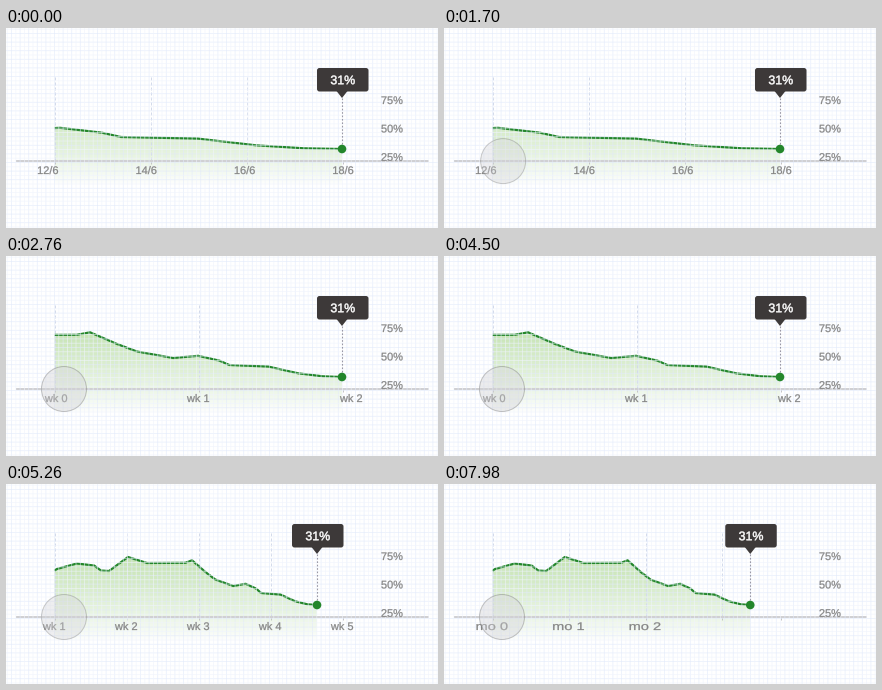
A matplotlib script for the animation above (8000 ms loop, 432x200 px).

```python
import numpy as np
import matplotlib.pyplot as plt
from matplotlib.animation import FuncAnimation
from matplotlib.collections import LineCollection
from matplotlib.colors import to_rgb
from matplotlib.patches import Circle, FancyBboxPatch, PathPatch, Polygon
from matplotlib.textpath import TextPath
from matplotlib.transforms import Affine2D

W, H, DPI = 432, 200, 100
STEP, LOOP = 20, 8000
PX = 72 / DPI
LEFT, RIGHT, AXIS_Y, TOP_Y, FADE_Y = 48.5, 336, 132.5, 70, 158
GREEN, DARK, GREY = "#23862b", "#3d3939", "#858585"

# Key points: distance back from the newest reading, height on the stage
BACK, LEVEL = np.array([
    (0, 121), (38, 120.3), (86, 117.3), (144, 110.6), (221, 109),
    (240, 104.7), (282, 99.8), (331, 102), (402, 95.5), (441, 88),
    (494, 76.3), (520, 78.8), (672, 79), (747, 73), (822, 87), (854, 86.5),
    (881, 81.5), (949, 79.5), (1028, 85), (1090, 97)]).T


def lerp(a, b, k):
    return a + (b - a) * k


def ease(p, power=3):
    p = min(max(p, 0), 1)
    if p < .5:
        return (2 * p) ** power / 2
    return 1 - (2 - 2 * p) ** power / 2


fig = plt.figure(figsize=(W / DPI, H / DPI), dpi=DPI, facecolor="white")
ax = fig.add_axes([0, 0, 1, 1])
ax.axis("off")


def glyphs(text, size, color, weight=.25, z=4):
    path = TextPath((0, 0), text, size=size,
                    prop={"family": "Liberation Sans"})
    box = path.get_extents()
    path = path.transformed(Affine2D().translate(-(box.x0 + box.x1) / 2, 0))
    return ax.add_patch(PathPatch(path, fc=color, ec=color, lw=weight * PX,
                                  zorder=z))


def place(patch, x, y, width=1, base=None):
    move = Affine2D().scale(width, -1).translate(x, y)
    patch.set_transform(move + (base or ax.transData))


def rule(xs, ys, color, width, **kw):
    return ax.plot(xs, ys, color=color, lw=width * PX,
                   solid_capstyle="butt", **kw)[0]


class Label:
    """Axis text whose place, opacity and width follow the zoom."""

    def __init__(self, text, x0, x1=None, fade=(1, 1), width=(1, 1)):
        self.patch = glyphs(text, 11, GREY)
        self.x = x0, x0 if x1 is None else x1
        self.fade, self.width = fade, width

    def draw(self, k):
        place(self.patch, lerp(*self.x, k), 146, lerp(*self.width, k))
        self.patch.set_alpha(lerp(*self.fade, k))


class Stage:
    """A zoom: curve scale, newest x and tick gap at its end."""

    def __init__(self, start, span, scale, end, gaps, labels):
        self.start, self.span, self.gaps = start, span, gaps
        self.scale, self.end, self.labels = scale, end, labels


def week(i):
    x = 48 + 72 * (i - 1)
    if i % 2:
        return Label(f"wk {i}", x, width=(.63, 1))
    return Label(f"wk {i}", x + 83, x, fade=(.15, 1))


days = [Label(f"{12 + 2 * i}/6", 42 + 98.4 * i) for i in range(4)]
pair = [Label("wk 0", 42, 50), Label("wk 1", 239, 192),
        Label("wk 2", 345, fade=(.8, 1)), Label("wk 6", 336, fade=(1, 0)),
        Label("wk 4", 141, 192, fade=(1, 0), width=(.7, .7))]
weeks = [week(i) for i in range(1, 6)]
months = [Label(f"mo {i}", 48 + 72 * i, 48 + 81 * i, width=(1.33, 1.33))
          for i in range(3)]

STAGES = [Stage(0, 1, 1, RIGHT, (96, 96), days),
          Stage(2040, 720, .51, RIGHT, (192, 144), pair),
          Stage(4680, 600, .253, 311, (72, 72), weeks),
          Stage(7860, 240, .2435, 301.5, (72, 81), months)]

# Graph paper lies over the chart: main lines and fainter halves
pitch = 8.6
for first, tone in ((5.5, "#e2eafb"), (5.5 - pitch / 2, "#f0f4fd")):
    lines = [[(x, 0), (x, H)] for x in np.arange(first, W, pitch)]
    lines += [[(0, y), (W, y)] for y in np.arange(first, H, pitch)]
    paper = LineCollection(lines, colors=tone, linewidths=.8 * PX, alpha=.7,
                           zorder=3.5)
    paper.set_snap(False)
    ax.add_collection(paper)

# Soft green area, fading downwards
shade = np.ones((FADE_Y - TOP_Y, 1, 4))
shade[..., :3] = to_rgb("#8cc866")
shade[:, 0, 3] = .52 * (1 - np.linspace(0, 1, FADE_Y - TOP_Y)) ** .9
area = ax.imshow(shade, extent=(0, W, FADE_Y, TOP_Y), aspect="auto",
                 interpolation="bilinear", zorder=1)
ax.set(xlim=(0, W), ylim=(H, 0))
outline = Polygon([(0, 0), (1, 0), (1, 1)], transform=ax.transData)
area.set_clip_path(outline)

guides = LineCollection([], colors="#d3daea", linewidths=PX,
                        linestyles=[(0, (3, 2))], zorder=2)
ticks = LineCollection([], colors="#c4c4c6", linewidths=PX, zorder=2)
ax.add_collection(guides)
ax.add_collection(ticks)
rule([10, 423], [AXIS_Y] * 2, "#d0d0d3", 2, zorder=2.5)
curve = rule([], [], GREEN, 2.2, zorder=3, solid_joinstyle="round")

for i, text in enumerate(("75%", "50%", "25%")):
    place(glyphs(text, 11, GREY), 386, 76 + 28.4 * i)

# Marker, dotted stem and callout travel together
shift = Affine2D()
carried = shift + ax.transData
rule([0, 0], [TOP_Y, 117], "#9a98a5", 1.1, ls=(0, (1.5, 1.6)), zorder=5,
     transform=carried)
ax.add_patch(Circle((0, 121), 4.3, fc=GREEN, lw=0, zorder=6,
                    transform=carried))
ax.add_patch(FancyBboxPatch((-23, 42), 47.5, 19.5, fc=DARK, lw=0, zorder=6,
                            boxstyle="round,pad=2,rounding_size=2.5",
                            transform=carried))
ax.add_patch(Polygon([(-5.5, 63), (5.5, 63), (0, TOP_Y)], fc=DARK, lw=0,
                     zorder=6, transform=carried))
place(glyphs("31%", 12.4, "white", .45, z=7), .8, 56.2, base=carried)

touch = ax.add_patch(Circle((0, 0), 22.5, lw=PX, zorder=8))


def draw_touch(t):
    k = ease((t - 740) / 1150, 4)
    touch.center = (lerp(250, 58, k),
                    lerp(-25, 133, k) + 55 * np.sin(np.pi * k))
    pressed = 1880 <= t <= 2760 or 4500 <= t < 5260 or t >= 7740
    touch.set_facecolor((.82, .82, .83, .4 if pressed else .35))
    touch.set_edgecolor((.45, .45, .45, .4 if pressed else .35))


def draw_chart(scale, end):
    shift.clear().translate(end, 0)
    xs = end - BACK * scale
    keep = xs > LEFT
    x = np.append(xs[keep], LEFT)
    y = np.append(LEVEL[keep], np.interp((end - LEFT) / scale, BACK, LEVEL))
    curve.set_data(x, y)
    outline.set_xy(np.vstack([np.column_stack([x, y]),
                              [(LEFT, FADE_Y), (end, FADE_Y)]]))


def draw_axis(stage, k):
    for other in STAGES:
        for label in other.labels:
            label.patch.set_visible(other is stage)
    for label in stage.labels:
        label.draw(k)
    xs = np.arange(LEFT, RIGHT - 5, lerp(*stage.gaps, k))
    guides.set_segments([[(x, 49), (x, AXIS_Y)] for x in xs])
    ticks.set_segments([[(x, AXIS_Y), (x, 136)] for x in [*xs, RIGHT + .5]])


def update(i):
    t = i * STEP
    n = sum(t > s.start for s in STAGES[1:])
    stage, before = STAGES[n], STAGES[max(n - 1, 0)]
    k = ease((t - stage.start) / stage.span)
    draw_chart(lerp(before.scale, stage.scale, k),
               lerp(before.end, stage.end, k))
    draw_axis(stage, k)
    draw_touch(t)


anim = FuncAnimation(fig, update, frames=LOOP // STEP, interval=STEP,
                     repeat=True, repeat_delay=0)
plt.show()
```
